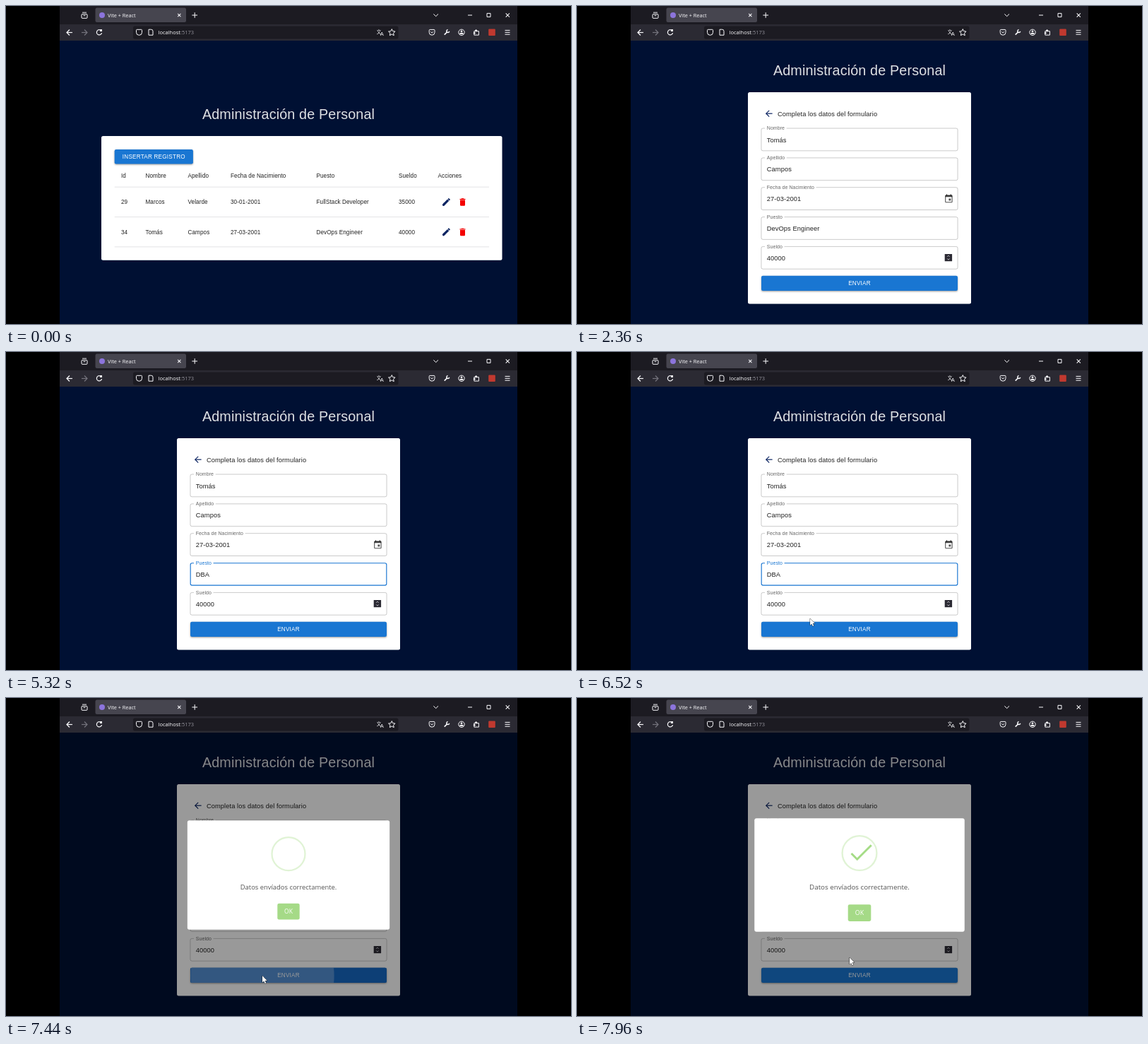
These frames come from a looping animation (800 px wide and 450 px high, 8 s). An HTML page with a canvas:

```html
<!DOCTYPE html>
<html lang="es">
<head>
<meta charset="utf-8">
<title>Administración de Personal</title>
<style>
  html, body { margin: 0; width: 100%; height: 100%; overflow: hidden; background: #000; }
  canvas { display: block; width: 800px; height: 450px; }
</style>
</head>
<body>
<canvas id="stage"></canvas>
<script>
const LOOP = 8000;
const canvas = document.getElementById('stage');
const ctx = canvas.getContext('2d');
const dpr = window.devicePixelRatio || 1;
canvas.width = 800 * dpr;
canvas.height = 450 * dpr;

// The page is shown zoomed out: one CSS pixel of it on the stage
const PX = .581;
const SMALL = 14 * PX, BODY = 16 * PX;
const SANS = '"Liberation Sans", Arial, sans-serif';
const UI = '"Open Sans", "Noto Sans", sans-serif';
const CJK = '"Noto Sans CJK SC", "Noto Sans CJK", sans-serif';
const INK = 'rgba(0,0,0,.87)', NAVY = '#0b2361', LIGHT = '#fbfbfe';
const BLUE = '#1976d2', BLUE_HOVER = '21,101,192';

// Moments of the interaction, in ms
const OPEN_FORM = 2280, CURSOR_IN = 2720, PRESS_TEXT = 3640, DRAG_END = 3920;
const TYPED = [4800, 4960, 5200], BLINK = 520, CURSOR_BACK = 6080;
const ENTER_BTN = 6620, PRESS_BTN = 7232, POPUP = 7380;

const ROWS = [
  ['29', 'Marcos', 'Velarde', '30-01-2001', 'FullStack Developer', '35000'],
  ['34', 'Tomás', 'Campos', '27-03-2001', 'DevOps Engineer', '40000']
];
const HEAD = ['Id', 'Nombre', 'Apellido', 'Fecha de Nacimiento', 'Puesto', 'Sueldo', 'Acciones'];
const COLS = [163, 197.5, 257.5, 318, 439.5, 556, 611.5];

// Form fields share one outer box, stacked at a fixed pitch
const FIELD = { x: 260.6, y: 172.7, w: 278.8, h: 32.5, pitch: 72 * PX };
const JOB = 3;
const fieldTop = i => FIELD.y + i * FIELD.pitch;
const BTN = [261, 381.8, 278, 21.3];

const mix = (a, b, p) => a + (b - a) * p;
const span = (t, from, length) => Math.min(1, Math.max(0, (t - from) / length));
const linear = p => p;

function bezier(x1, y1, x2, y2) {
  const at = (a, b, u) => 3 * a * u * (1 - u) ** 2 + 3 * b * u * u * (1 - u) + u ** 3;
  return x => {
    let lo = 0, hi = 1;
    for (let i = 0; i < 24; i++) {
      const mid = (lo + hi) / 2;
      if (at(x1, x2, mid) < x) lo = mid; else hi = mid;
    }
    return at(y1, y2, (lo + hi) / 2);
  };
}
const ease = bezier(.25, .1, .25, 1);
const standard = bezier(.4, 0, .2, 1);

// keys: [time, ...values], with the curve applied inside each segment
function track(keys, t, curve) {
  const i = keys.findIndex(k => t < k[0]);
  if (i < 1) return keys.at(i).slice(1);
  const a = keys[i - 1], b = keys[i];
  const p = curve(span(t, a[0], b[0] - a[0]));
  return a.slice(1).map((v, j) => mix(v, b[j + 1], p));
}

function at(x, y, paint, { turn = 0, zoom = 1 } = {}) {
  ctx.save();
  ctx.translate(x, y);
  ctx.rotate(turn);
  ctx.scale(zoom, zoom);
  paint();
  ctx.restore();
}

function shape(x, y, w, h, r) {
  ctx.beginPath();
  ctx.roundRect(x, y, w, h, r);
}

function rect(x, y, w, h, fill, r = 0) {
  shape(x, y, w, h, r);
  ctx.fillStyle = fill;
  ctx.fill();
}

function box(x, y, w, h, color, width = 1, r = 0) {
  shape(x, y, w, h, r);
  ctx.strokeStyle = color;
  ctx.lineWidth = width;
  ctx.stroke();
}

function clipped(x, y, w, h, r, paint) {
  ctx.save();
  shape(x, y, w, h, r);
  ctx.clip();
  paint();
  ctx.restore();
}

function line(color, width, ...pts) {
  ctx.strokeStyle = color;
  ctx.lineWidth = width;
  ctx.beginPath();
  for (let i = 0; i < pts.length; i += 2) ctx.lineTo(pts[i], pts[i + 1]);
  ctx.stroke();
}

function disc(x, y, r, fill) {
  rect(x - r, y - r, 2 * r, 2 * r, fill, r);
}

function ring(x, y, r, color, width = 1, from = 0, to = Math.PI * 2) {
  ctx.strokeStyle = color;
  ctx.lineWidth = width;
  ctx.beginPath();
  ctx.arc(x, y, r, from, to);
  ctx.stroke();
}

function setFont(size, gap, font = SANS) {
  ctx.font = `${size}px ${font}`;
  ctx.letterSpacing = gap * size + 'px';
}

function widthOf(str, size, gap) {
  setFont(size, gap);
  return ctx.measureText(str).width;
}

function text(str, x, y, size, color, { font, gap = 0, align = 'left' } = {}) {
  setFont(size, gap, font);
  ctx.textAlign = align;
  ctx.fillStyle = color;
  ctx.fillText(str, x, y);
}

// Small symbols, all centred on x, y
const chevron = (x, y, r, dir, c = LIGHT, w = 1) =>
  line(c, w, x - r, y - dir * r / 2, x, y + dir * r / 2, x + r, y - dir * r / 2);

const dash = (x, y, r, c = LIGHT) => line(c, 1, x - r, y, x + r, y);

const plus = (x, y, r, turn = 0) => at(x, y, () => {
  dash(0, 0, r);
  line(LIGHT, 1, 0, -r, 0, r);
}, { turn });

const arrow = (x, y, r, dir, color) => at(x, y, () => {
  line(color, 1.2, -r, 0, r, 0);
  line(color, 1.2, 0, -r, r, 0, 0, r);
}, { turn: dir < 0 ? Math.PI : 0 });

const badge = (x, y, r) => box(x - r, y - r, 2 * r, 2 * r, LIGHT, 1, [1, 1, r, r]);

function star(x, y, r) {
  const pts = [];
  for (let i = 0; i <= 10; i++) {
    const a = (i / 5 - .5) * Math.PI, d = i % 2 ? r * .48 : r;
    pts.push(x + d * Math.cos(a), y + d * Math.sin(a));
  }
  line(LIGHT, 1, ...pts);
}

const pencil = (x, y) => at(x, y, () => {
  rect(-1.6, -6.6, 3.2, 2, NAVY, .6);
  rect(-1.6, -4, 3.2, 8, NAVY);
  rect(-1.6, 3, 3.2, 4, NAVY, [0, 0, 1.6, 1.6]);
}, { turn: Math.PI / 4 });

const trash = (x, y) => at(x, y, () => {
  rect(-4, -4.6, 8, 1.2, '#f40000');
  rect(-1.8, -5.3, 3.6, 1, '#f40000');
  rect(-3.5, -2.9, 7, 8.2, '#f40000', [0, 0, 1.2, 1.2]);
});

const calendar = (x, y) => at(x, y, () => {
  const c = 'rgba(0,0,0,.68)';
  box(-4.7, -4.4, 9.4, 9.7, c, 1.1, .8);
  rect(-4.7, -4.6, 9.4, 2.4, c);
  rect(0, 0, 2.9, 2.9, c);
  for (const side of [-1, 1]) rect(side * 2.9 - .6, -6.3, 1.2, 2, c);
});

function drawTabs() {
  rect(76, 0, 648, 26, '#1c1b22');
  rect(126.5, 2.5, 128.5, 20.5, '#46454f', 2.5);
  box(107, 11.5, 8, 5.8, LIGHT, 1, 1);
  dash(111, 9.2, 3);
  dash(111, 13.6, 1.5);
  disc(136, 13, 4, '#8c74dc');
  text('Vite + React', 144, 15.7, 7.3, LIGHT, { font: UI });
  plus(245.3, 13, 3, Math.PI / 4);
  plus(267.2, 13, 3.8);
  chevron(608.7, 13, 3.3, 1);
  dash(657, 13, 3);
  box(681, 10.4, 5, 5, LIGHT);
  plus(710.3, 13, 3.7, Math.PI / 4);
}

function drawToolbar() {
  rect(76, 26, 648, 23, '#2b2a33');
  arrow(90, 37.5, 4, -1, LIGHT);
  arrow(111, 37.5, 4, 1, '#74737c');
  ring(132, 37.3, 3.6, LIGHT, 1.2, .2, 5.4);
  rect(133, 33, 3, 3, LIGHT);

  rect(180, 28.5, 375.5, 18, '#1c1b22', 2.5);
  badge(188.5, 37.3, 4);
  box(202, 33.2, 6, 8, LIGHT, 1, [0, 2.5, 0, 0]);
  text('localhost', 215.5, 40.2, 7.5, LIGHT, { font: UI });
  const w = ctx.measureText('localhost').width;
  text(':5173', 215.5 + w, 40.2, 7.5, '#92919a', { font: UI });
  text('文', 524.8, 38.8, 6.5, LIGHT, { font: CJK });
  text('A', 529.8, 41.5, 7.5, LIGHT);
  star(546.3, 37.6, 5);

  badge(603.1, 37.3, 3.9);
  chevron(603.1, 37.2, 1.9, 1);
  line(LIGHT, 1.7, 620.7, 40.7, 625, 36.5);
  ring(625.8, 35.5, 2, LIGHT, 1.4, .2, 4.6);
  ring(645, 37.3, 4.2, LIGHT);
  disc(645, 36, 1.4, LIGHT);
  rect(642.4, 38.1, 5.2, 2, LIGHT, 1);
  box(662.8, 35.6, 6.6, 5.5, LIGHT);
  disc(665.6, 34.8, 1.5, LIGHT);
  disc(663.2, 38.3, 1.3, LIGHT);
  rect(683.2, 32.5, 9.6, 9.6, '#c0392f', 1);
  for (let i = -1; i <= 1; i++) dash(710, 37.3 + i * 2.9, 3.5);
}

function button([x, y, w, h], label, hover = 0) {
  ctx.save();
  ctx.shadowColor = 'rgba(0,0,0,.4)';
  ctx.shadowBlur = 2.5 * dpr;
  ctx.shadowOffsetY = dpr;
  rect(x, y, w, h, BLUE, 2.3);
  ctx.restore();
  rect(x, y, w, h, `rgba(${BLUE_HOVER},${hover})`, 2.3);
  text(label, x + w / 2, y + h / 2 + 2.9, SMALL, '#fff', { gap: .02857, align: 'center' });
}

const heading = y =>
  text('Administración de Personal', 400, y, 34 * PX, '#dedfe3', { gap: .00735, align: 'center' });

function drawTable() {
  const pitch = 42.4;
  const cell = (s, i, y) => text(s, COLS[i], y + 2.9, SMALL, INK, { gap: .0107 });
  heading(160.4);
  rect(135, 184, 567.5, 175.7, '#fff', 2.5);
  button([153.7, 202.9, 111.2, 20.6], 'INSERTAR REGISTRO');
  HEAD.forEach((s, i) => cell(s, i, 239.6));
  ROWS.forEach((row, r) => {
    const y = 277.5 + r * pitch;
    row.forEach((s, i) => cell(s, i, y));
    pencil(623.3, y);
    trash(646.5, y);
  });
  for (let i = 0; i < 3; i++) rect(153.7, 255.7 + i * pitch, 530.3, .7, '#dcdcde');
}

const FRAMES = { idle: ['rgba(0,0,0,.3)', .7], hover: [INK, .7], focus: [BLUE, 2 * PX] };
const VALUE_X = 268.8, GAP = .0094;

function field(top, label, value, state) {
  const { x, w, h } = FIELD, size = 12 * PX;
  const [color, width] = FRAMES[state];
  box(x + width / 2, top + width / 2, w - width, h - width, color, width, 2.3);
  rect(266, top - 1, widthOf(label, size, GAP) + 5.5, 3, '#fff');
  text(label, VALUE_X, top + 2.5, size, state === 'focus' ? BLUE : 'rgba(0,0,0,.6)', { gap: GAP });
  text(value, VALUE_X, top + 19.8, BODY, INK, { gap: GAP });
}

function overField(i, { x, y }) {
  const top = fieldTop(i);
  return x > FIELD.x && x < FIELD.x + FIELD.w && y > top && y < top + FIELD.h;
}

function drawSelection(value, cur) {
  const end = VALUE_X + widthOf(value, BODY, GAP);
  const left = Math.max(VALUE_X, cur.x);
  clipped(left, 309, Math.max(0, end - left), 11.5, 0, () => {
    rect(left, 309, end - left, 11.5, '#0078d7');
    text(value, VALUE_X, fieldTop(JOB) + 19.8, BODY, '#fff', { gap: GAP });
  });
}

function drawCaret(value, t) {
  const since = t - (t < 5320 ? TYPED[0] : 5320 - BLINK);
  const on = t < 5320 || Math.floor(since / BLINK) % 2 === 0;
  if (on) rect(VALUE_X + widthOf(value, BODY, GAP), 310, .8, 10, INK);
}

function drawForm(t, cur) {
  heading(98.4);
  rect(242, 122, 316, 299.6, '#fff', 2.5);
  arrow(272.2, 152.2, 4.4, -1, NAVY);
  text('Completa los datos del formulario', 284, 155.5, BODY, INK, { gap: GAP });

  const letters = TYPED.filter(at => t >= at).length;
  const values = ROWS[1].slice(1);
  if (letters) values[JOB] = 'DBA'.slice(0, letters);
  const focused = t >= PRESS_TEXT && t < PRESS_BTN;
  values.forEach((value, i) => {
    const hover = cur && t < POPUP && overField(i, cur);
    const state = i === JOB && focused ? 'focus' : hover ? 'hover' : 'idle';
    field(fieldTop(i), HEAD[i + 1], value, state);
  });
  if (focused && !letters) drawSelection(values[JOB], cur);
  if (focused && letters && t < 5320 + 2 * BLINK) drawCaret(values[JOB], t);

  calendar(526.4, 272.5);
  rect(520.7, 351, 10.4, 10.2, '#2b2a33');
  for (const dir of [-1, 1]) chevron(525.9, 356.1 + dir * 2.2, 1.7, dir, '#e8e8ee', .8);

  button(BTN, 'ENVIAR', standard(span(t, ENTER_BTN, 250)) - standard(span(t, POPUP, 250)));
  const grow = standard(span(t, PRESS_BTN, 550));
  const fade = 1 - standard(span(t, PRESS_BTN + 110, 550));
  clipped(...BTN, 2.3, () => disc(363, 393, 178 * grow, `rgba(255,255,255,${.3 * fade})`));
}

// Two strokes of the tick, revealed one after the other
function drawTick(p) {
  const short = Math.min(1, p * 3), long = Math.max(0, (p * 3 - 1) / 2);
  if (!p) return;
  const pts = [-11.5, .5, mix(-11.5, -3.3, short), mix(.5, 8.7, short)];
  if (long) pts.push(mix(-3.3, 17, long), mix(8.7, -11.6, long));
  line('#a5dc86', 2.9, ...pts);
}

function drawPopup(t) {
  const dt = t - POPUP;
  if (dt < 0) return;
  rect(76, 49, 648, 401, `rgba(0,0,0,${.4 * ease(span(dt, 0, 60))})`);
  const [zoom] = track([[0, .7], [135, 1.05], [240, .95], [300, 1]], dt, ease);
  at(400, 250.5, () => {
    rect(-148.75, -80.2, 297.5, 160.4, '#fff', 2.9);
    at(0, -31, () => {
      ring(0, 0, 24.4, 'rgba(165,220,134,.35)', 4 * PX);
      drawTick(ease(span(dt, 405, 200)));
    });
    text('Datos envíados correctamente.', 0, 20.8, 9.77, '#545454', { font: UI, align: 'center' });
    rect(-16.3, 41.8, 32.6, 23.6, '#a5da87', 2.3);
    text('OK', 0, 56.9, 8.8, '#fff', { font: UI, align: 'center' });
  }, { zoom });
}

const PATH = [
  [CURSOR_IN, 625, 322], [3160, 440, 358], [3560, 353.5, 320.5], [PRESS_TEXT, 346, 320.5],
  [DRAG_END, 256.5, 322], [CURSOR_BACK, 256.5, 322], [6520, 330, 377], [6840, 363, 393],
  [7760, 363, 393], [7960, 386, 367.3]
];

function cursorAt(t) {
  if (t < CURSOR_IN || (t >= TYPED[0] && t < CURSOR_BACK)) return null;
  const [x, y] = track(PATH, t, linear);
  const dragging = t >= PRESS_TEXT && t < CURSOR_BACK;
  const inField = overField(JOB, { x, y }) || overField(JOB + 1, { x, y });
  return { x, y, beam: t < POPUP && (dragging || inField) };
}

function drawCursor({ x, y, beam }) {
  at(x, y, () => {
    if (beam) {
      line('#777', .9, 0, -4.2, 0, 4.2);
      for (const end of [-4.5, 4.5]) dash(0, end, 1.8, '#777');
      return;
    }
    line('#111', .8, 0, 0, 0, 9.6, 2.2, 7.6, 3.7, 11, 5.2, 10.3, 3.7, 7, 6.7, 7, 0, 0);
    ctx.fillStyle = '#fff';
    ctx.fill();
  });
}

function draw(t) {
  ctx.setTransform(dpr, 0, 0, dpr, 0, 0);
  rect(0, 0, 800, 450, '#000');
  rect(76, 49, 648, 401, '#001033');
  const cur = cursorAt(t);
  if (t < OPEN_FORM) drawTable();
  else drawForm(t, cur);
  drawPopup(t);
  drawTabs();
  drawToolbar();
  if (cur) drawCursor(cur);
}

const start = performance.now();
function frame() {
  draw((performance.now() - start) % LOOP);
  requestAnimationFrame(frame);
}
frame();
</script>
</body>
</html>
```
